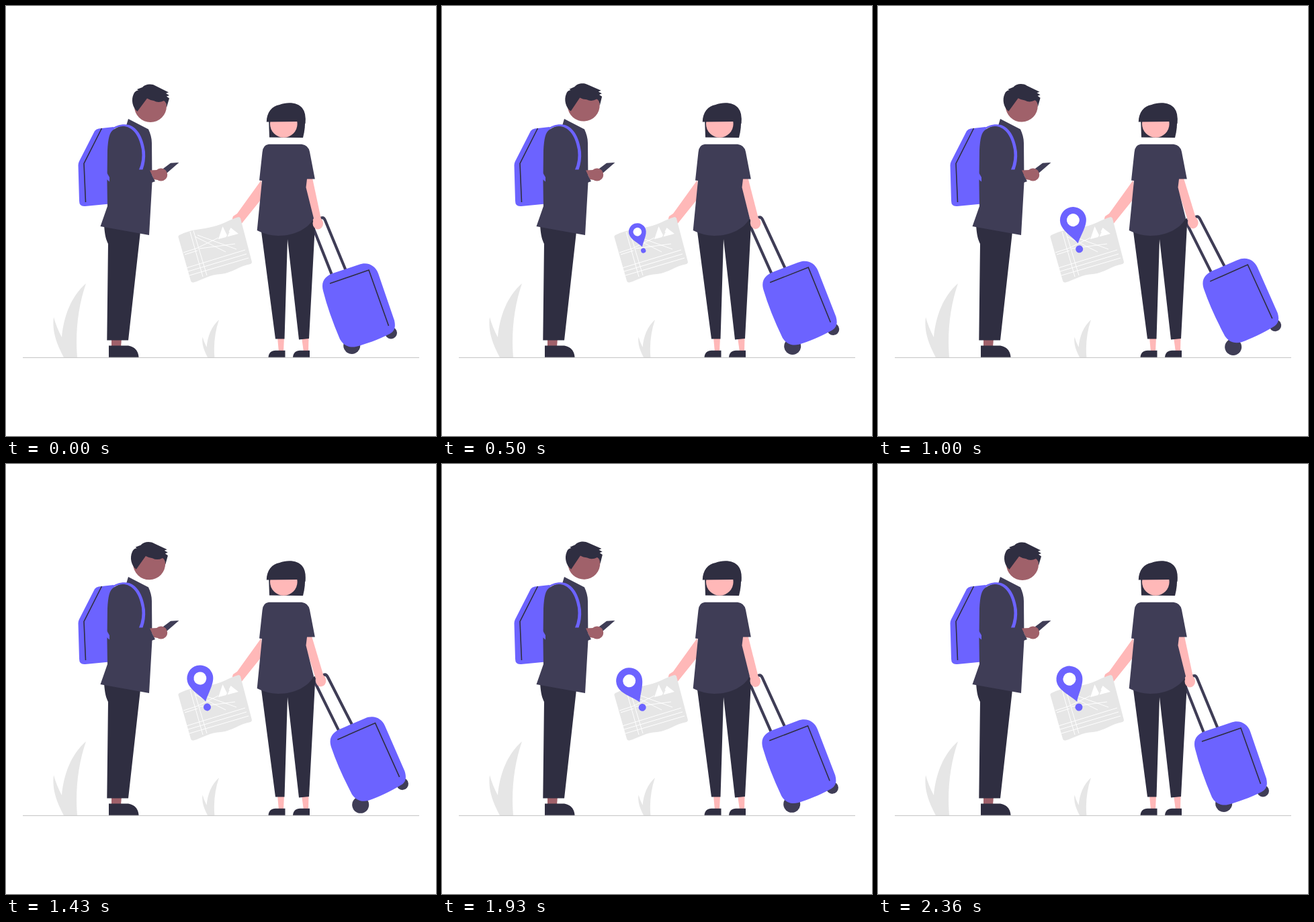
An HTML page for the animation above (2.43 s loop, 640 by 640 pixels).

```html
<!DOCTYPE html>
<html lang="en">
<head>
<meta charset="utf-8">
<title>Travellers</title>
<style>
  html, body { margin: 0; width: 100%; height: 100%; overflow: hidden; background: #fff; }
  svg { display: block; width: 100%; height: 100%; }
  .ink { fill: #2f2e41; }
  .cloth { fill: #3f3d56; }
  .violet { fill: #6c63ff; }
  .grey { fill: #e6e6e6; }
  .tan { fill: #a0616a; }
  .pink { fill: #ffb8b8; }
  .line { fill: none; stroke: #2f2e41; stroke-width: 1.6; }
  .bar { fill: none; stroke: #3f3d56; stroke-width: 4.2; stroke-linejoin: round; }
  .road { fill: none; stroke: #fff; stroke-width: 1; }
</style>
</head>
<body>
<svg viewBox="0 0 640 640">
  <g class="grey">
    <path id="plant" d="M86 523C77 506 68 486 71 463Q75 478 83 493C86 460 98 431 119 413C107 448 103 486 106 523Z"/>
    <use href="#plant" transform="translate(256.3 256.3) scale(.51)"/>
  </g>
  <path d="M25 523.3H615" stroke="#ccc" stroke-width="1.3"/>

  <!-- man -->
  <path class="tan" d="M157 495H172L171 508H157Z"/>
  <path class="ink" d="M153 505.5H182C192 507 197 514 197.5 522.7H153Z"/>
  <path class="ink" d="M146 326C147 342 149 348 152 354L150.3 497.5H182L200 336Z"/>
  <path class="violet" d="M138 182.5L160 180L166 200L154 294.5L118 298Q109 299 109 290L107.5 237Q107.5 234 109 231L132 186Q134 183 138 182.5Z"/>
  <path class="line" d="M142.500 182L116 234.500L118.500 292"/>
  <path class="cloth" d="M182 168L212 183.500C215 190 217 197 217 204L217.500 262L213 341L140.500 328L151 298L150.500 262L151 215C152 197 154 188 160 184Q169 177 179 178Z"/>
  <path class="violet" d="M150 248L154 255V261.500L150 258Z"/>
  <path class="violet" d="M156 184C163 177 174 175 183 177C197 181 205 199 207 217Q208 231 203.500 243.500H198Q204 230 202 214C199 196 191 181 176 179Q165 178 156 187Z"/>
  <path class="cloth" d="M232 243.500L245 233.800L257.500 233L239 249Z"/>
  <path class="tan" d="M214 244.500L226 244V259L220 258Z"/>
  <circle class="tan" cx="230.700" cy="251" r="9.500"/>
  <path class="cloth" d="M213 244L222 261L215 263.500Z"/>
  <g id="head">
    <circle class="tan" cx="215" cy="149" r="24"/>
    <path class="ink" d="M195.500 157C188 151 186 139 190 131Q192 126 197 125.500L195 124L203 121C207 116 217 115 223 119L242 128.500L238 130L243 133L239 134.500L243 137.500L239 151Q239 143 235 141Q227 145 220 141Q214 140 210 137.500Z"/>
  </g>

  <!-- map -->
  <path class="pink" d="M380 259L382 285L353 321Q348 329 340 325Q335 319 338 313L344 309Z"/>
  <path class="grey" d="M258 341C276 332 288 333 301 330C320 327 332 318 346 314Q348 314 349 316L366 381Q366 383 364 384C347 387 337 397 320 399C304 399 292 408 279 411.500Q276 412 275 409L256.500 344Q256 342 258 341Z"/>
  <path class="road" d="M274 336L293 403M279 334.500L299 401M264 367L284 360.500L316 345M266 370L285 364M281 343L327 366M285 341L343 362M268 390L356 363M271 395L358 369M273 401L361 375M288 361L341 354"/>
  <path fill="#fff" d="M316 347L322.500 328L329 341L334.500 330L346 339Z"/>
  <path d="M328 345L332 336" stroke="#e6e6e6" stroke-width="1.500"/>
  <g id="pin" class="violet">
    <circle cy="-6.300" r="5.500"/>
    <path d="M0-15C-5-25-19.500-38-19.500-50.500a19.500 19.500 0 0 1 39 0C19.500-38 5-25 0-15Z"/>
    <circle cy="-50.500" r="9.500" fill="#fff"/>
  </g>

  <!-- suitcase -->
  <circle id="wheel" class="cloth" cx="514.700" cy="505.500" r="12.500"/>
  <g class="swing">
    <circle class="cloth" cx="573" cy="486.500" r="9"/>
    <path class="bar" d="M485 400L454 322L469 315.500Q473 314 475 319L506 394"/>
    <path class="violet" d="M489 397L525 385C539 380 550 387 554 398L578 468C580 477 579 484 571 488C553 497 536 503 521 507C510 509 502 505 497 496Q480 456 472 424C468 409 476 401 489 397Z"/>
    <path class="line" d="M482 413L540 393L569.500 476"/>
  </g>

  <!-- woman -->
  <path class="pink" d="M404 493H414L413 515H406ZM440 493H450.500L450 515H443Z"/>
  <path id="shoe" class="ink" d="M390.500 522.700C391 516 395 513 401 512.700H415.500V522.700Z"/>
  <use href="#shoe" x="36.500"/>
  <path class="ink" d="M379.500 332L401 495.500H414.500L419 347L436 496.500L451 495L460.500 316Z"/>
  <g class="swing pink">
    <path d="M446 254L456 256L469 317L457 320L445 268Z"/>
    <ellipse cx="464.300" cy="323.500" rx="7.800" ry="9"/>
  </g>
  <path class="cloth" d="M391 205.700H440Q450 207 452 217L459.800 257.500H448L446.500 270L458 316C450 331 430 342 405 342Q387 341 373.700 334L381 260L377 259.500L381.500 218Q382 207 391 205.700Z"/>
  <path class="ink" d="M391 165H445Q446 181 442 196L392 195.500Z"/>
  <circle class="pink" cx="413.300" cy="175.500" r="20.300"/>
  <path class="ink" d="M387.800 172.500C388 158 396 149 407 147C420 142 435 144 441 152Q447 159 445.500 175L433 172Z"/>
</svg>
<script>
  const LOOP = 2430, LEAD = 35;
  const $ = id => document.getElementById(id);
  const swings = document.querySelectorAll('.swing');
  const put = (el, value) => el.setAttribute('transform', value);

  // 0 at the start of a cycle, 1 halfway, linear both ways
  const wave = p => 1 - Math.abs(1 - 2 * (p % 1));

  // piecewise linear through [position, value] points
  function track(p, ...keys) {
    const i = keys.findIndex(k => p <= k[0]);
    const [a, u] = keys[i - 1] || keys[0], [b, v] = keys[i];
    return a === b ? u : u + (v - u) * (p - a) / (b - a);
  }

  function draw(now) {
    const p = ((now + LEAD) % LOOP) / LOOP;
    const k = wave(p) - wave(LEAD / LOOP);
    swings.forEach(el => put(el, `rotate(${-6 * k} 452 270)`));
    put($('wheel'), `translate(${17 * k} ${2.4 * k})`);
    const nod = wave(2 * p) - wave(2 * LEAD / LOOP);
    put($('head'), `rotate(${-3.6 * nod} 186 230)`);
    const grow = Math.min(1, 3 * p);
    const tilt = track(p, [0, 0], [1 / 3, 0], [1 / 2, 10], [5 / 6, -10], [1, 0]);
    put($('pin'), `translate(301 368) rotate(${tilt - 17.7}) scale(${grow < .05 ? 0 : grow})`);
  }

  const start = performance.now();
  function tick() {
    draw(performance.now() - start);
    requestAnimationFrame(tick);
  }
  tick();
</script>
</body>
</html>
```
